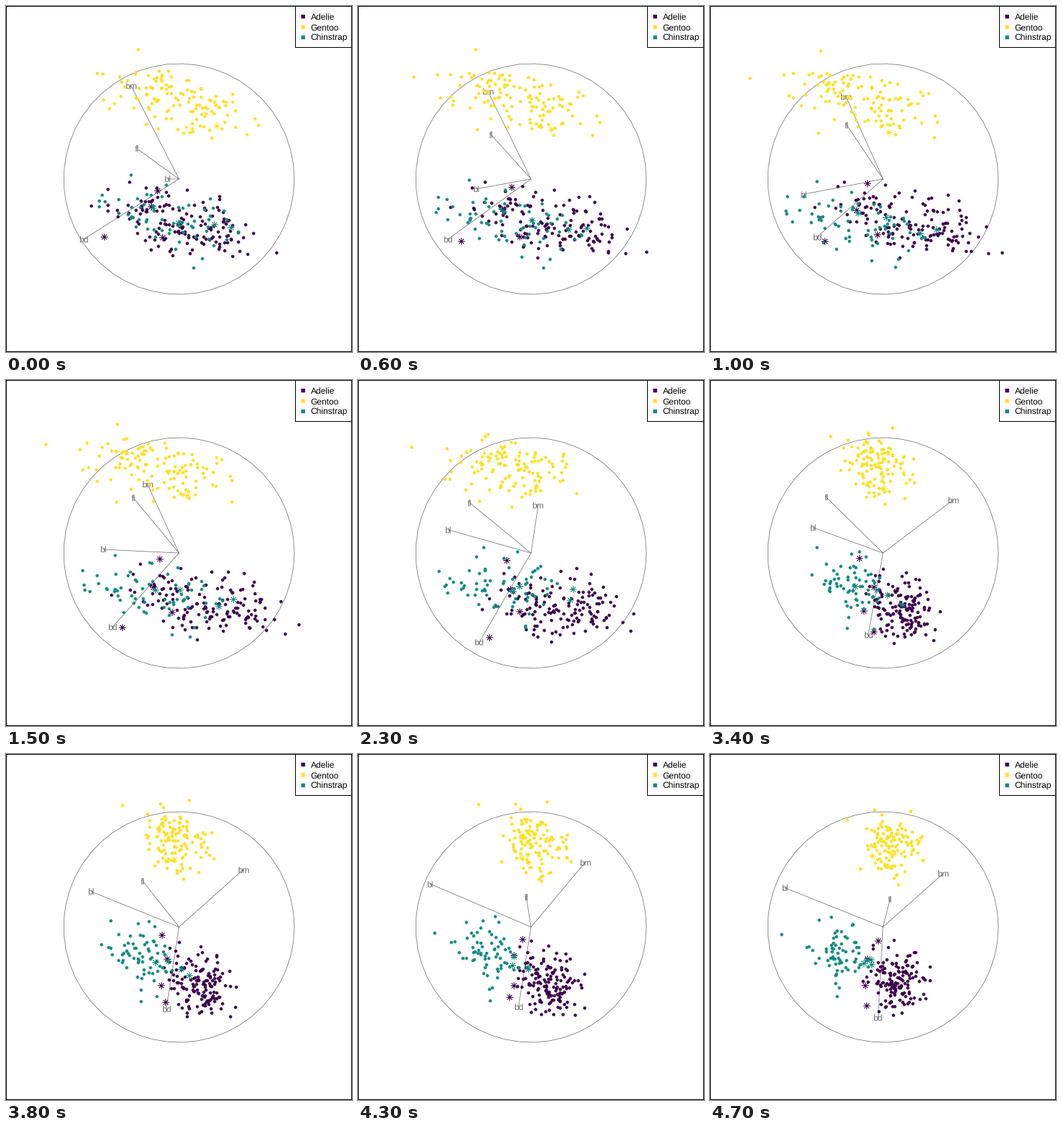
Write a matplotlib script that moves like this. It is 480 px wide and 480 px high and loops after 4800 ms.

```python
import numpy as np
import matplotlib.pyplot as plt
from matplotlib.animation import FuncAnimation
from matplotlib.patches import Polygon, Rectangle

SIZE, MID, RADIUS, SCALE = 480, 240, 160, 265
FRAMES, STEP = 48, 100
GREY = "#6e6e6e"

plt.rcParams.update({"font.family": "Liberation Sans", "text.hinting": "none"})
rng = np.random.default_rng(7)

# Variables, scaled to unit range: bill length, bill depth, flipper, body mass
LABELS = ["bl", "bd", "fl", "bm"]
SEX_SHIFT = np.array([.065, .088, .055, .095])
SPREAD = np.array([.083, .095, .095, .085])

# name: colour, number of dots, centre, starred points
SPECIES = {
    "Adelie": ("#3b004b", 142, [-.19, .14, -.18, -.14],
               [[.00, .10, .15, -.06], [.07, .21, -.07, -.02],
                [.07, .52, -.12, .00], [-.03, .24, -.07, -.20]]),
    "Gentoo": ("#fce025", 118, [.13, -.26, .275, .246],
               [[.16, -.33, .03, .12]]),
    "Chinstrap": ("#128a81", 64, [.176, .15, -.088, -.132],
                  [[-.11, -.07, -.24, -.28], [-.06, .02, -.34, -.17],
                   [-.02, .11, .02, -.22], [.07, .21, -.10, -.02]]),
}
EXTREMES = {"Gentoo": [.57, -.02, .49, .51], "Chinstrap": [.51, .08, -.34, -.14]}

# Planes where the tour turns: frame, x weights, y weights
TURNS = [
    (0, [-.10, -.83, -.36, -.41], [.00, -.53, .26, .81]),
    (11, [-.73, -.54, -.29, -.29], [-.16, -.51, .48, .70]),
    (17, [-.62, -.60, -.44, -.26], [.12, -.70, .46, .53]),
    (29, [-.71, -.24, -.54, .38], [.27, -.83, .39, .29]),
    (34, [-.61, -.13, -.49, .61], [.22, -.71, .48, .46]),
    (43, [-.87, -.11, -.04, .47], [.37, -.69, .26, .56]),
    (47, [-.85, -.04, .06, .52], [.34, -.78, .24, .46]),
]
TIMES = [turn[0] for turn in TURNS]
PLANES = np.array([turn[1:] for turn in TURNS])


def sample(n, center, rho=0.3):
    """Correlated cloud, half of it shifted up and half down by sex."""
    z = np.sqrt(rho) * rng.normal(size=(n, 1))
    z = np.clip(z + np.sqrt(1 - rho) * rng.normal(size=(n, 4)), -2.4, 2.4)
    z = (z - z.mean(0)) / z.std(0)
    sex = np.where(np.arange(n) % 2, 1, -1)[:, None]
    return np.array(center) + sex * SEX_SHIFT + z * SPREAD


def basis(frame):
    """Nearest orthonormal 4x2 plane to the blend of two turns."""
    i = np.clip(np.searchsorted(TIMES, frame) - 1, 0, len(TIMES) - 2)
    t = (frame - TIMES[i]) / (TIMES[i + 1] - TIMES[i])
    blend = (1 - t) * PLANES[i] + t * PLANES[i + 1]
    u, _, vt = np.linalg.svd(blend.T, full_matrices=False)
    return u @ vt


def to_stage(xy, scale):
    return MID + scale * xy * [1, -1]


fig = plt.figure(figsize=(SIZE / 72, SIZE / 72), dpi=72, facecolor="white")
ax = fig.add_axes([0, 0, 1, 1])
ax.set(xlim=(0, SIZE), ylim=(SIZE, 0))
ax.axis("off")


def box(x, y, w, h, z, face="white", lw=1):
    ax.add_patch(Rectangle((x, y), w, h, fc=face, ec="black", lw=lw,
                           snap=False, zorder=z))


box(0.5, 0.5, SIZE - 1, SIZE - 1, 0)
angle = np.linspace(0, 2 * np.pi, 50)
ring = np.column_stack([np.cos(angle), np.sin(angle)])
ax.add_patch(Polygon(to_stage(ring, RADIUS), fill=False, ec=GREY, lw=0.75,
                     zorder=1))

spokes = [ax.plot([], [], color=GREY, lw=0.75, zorder=1)[0] for _ in LABELS]
tags = [ax.text(0, 0, s, color=GREY, size=12, ha="center", va="baseline",
                zorder=2) for s in LABELS]

box(401.5, 0.5, SIZE - 402, 57, 8)
clouds = []
for i, (name, (color, count, center, starred)) in enumerate(SPECIES.items()):
    dots = ax.scatter([], [], s=20, c=color, linewidths=0, zorder=3 + i)
    stars = ax.scatter([], [], s=78, c=color, marker=(8, 2, 0),
                       linewidths=0.8, zorder=3.5 + i)
    points = sample(count, center)
    if name in EXTREMES:
        points[0] = EXTREMES[name]
    clouds += [(dots, points), (stars, np.array(starred))]

    y = 14.5 + 14.4 * i
    box(409.5, y - 2.5, 5.4, 5.4, 9, color, 0)
    ax.text(422.6, y + 4.5, name, size=12, va="baseline", zorder=9)


def draw(frame):
    plane = basis(frame)
    for spoke, tag, (x, y) in zip(spokes, tags, to_stage(plane, RADIUS)):
        spoke.set_data([MID, x], [MID, y])
        tag.set_position((x, y + 4.3))
    for artist, data in clouds:
        artist.set_offsets(to_stage(data @ plane, SCALE))
    return spokes + tags + [artist for artist, _ in clouds]


anim = FuncAnimation(fig, draw, frames=FRAMES, interval=STEP, repeat=True,
                     repeat_delay=0, blit=False)
plt.show()
```
